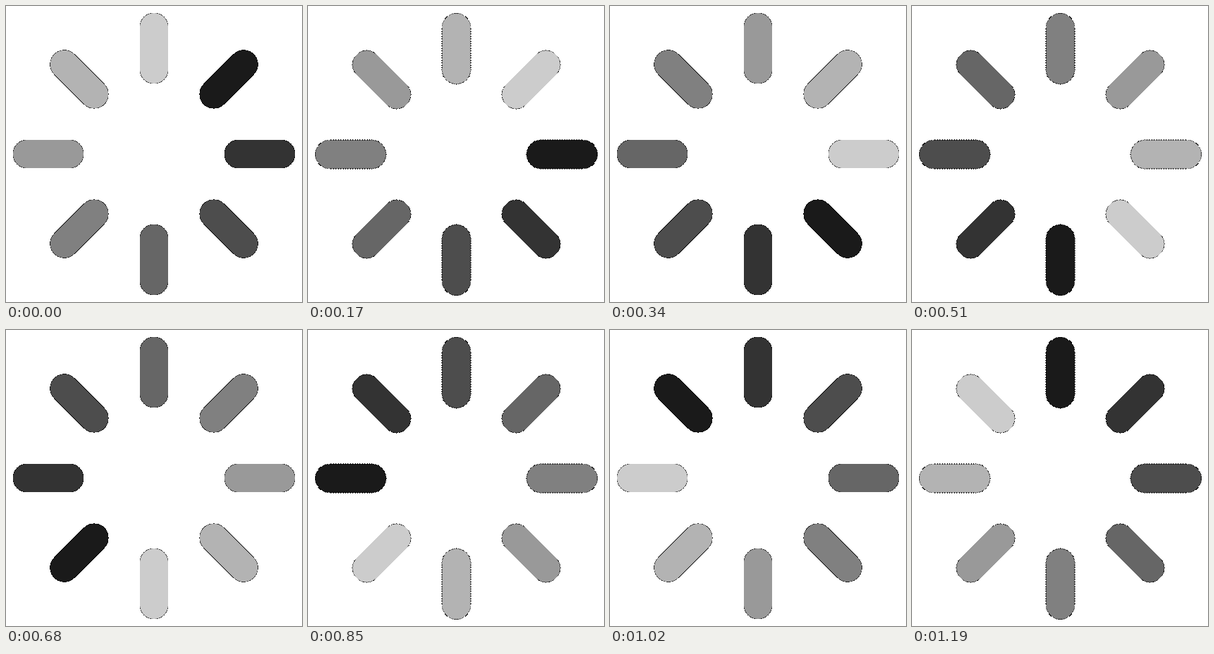
An HTML page with a canvas that plays this animation: 420 px wide and 420 px high, repeating every 1360 ms.

```html
<!DOCTYPE html>
<html lang="en">
<head>
<meta charset="utf-8">
<title>Spinner</title>
<style>
  html, body { margin: 0; width: 100%; height: 100%; overflow: hidden; background: #fff; }
  canvas { display: block; }
</style>
</head>
<body>
<canvas id="stage" width="420" height="420"></canvas>
<script>
const SIZE = 420, BARS = 8, STEP_MS = 170;
const INNER = 120, OUTER = 180, RADIUS = 20;
const TURN = Math.PI / 4, SUB = 4;
const ctx = document.getElementById('stage').getContext('2d');

const barAt = (x, y) => (Math.round(Math.atan2(x, -y) / TURN) + BARS) % BARS;

// Signed distance from a point, relative to the centre, to the edge of a bar.
function distance(x, y, bar) {
  const s = Math.sin(bar * TURN), c = Math.cos(bar * TURN);
  const along = x * s - y * c, across = x * c + y * s;
  return Math.hypot(across, Math.max(INNER - along, along - OUTER, 0)) - RADIUS;
}

// Fraction of the unit pixel centred on (x, y) that the bar covers.
function coverage(x, y, bar) {
  const dist = distance(x, y, bar);
  if (Math.abs(dist) > 0.75) return dist < 0 ? 1 : 0;
  let hits = 0;
  for (let i = 0; i < SUB * SUB; i++) {
    const dx = (i % SUB + 0.5) / SUB - 0.5;
    const dy = (Math.floor(i / SUB) + 0.5) / SUB - 0.5;
    if (distance(x + dx, y + dy, bar) < 0) hits++;
  }
  return hits / (SUB * SUB);
}

// Partly covered pixels are opaque and fade to black, which leaves a dark rim.
function shade(x, y, step) {
  const bar = barAt(x, y);
  const cover = coverage(x, y, bar);
  const level = (bar - step - 1 + 2 * BARS) % BARS + 1;
  return cover > 0 ? Math.round(level * 25.5 * cover) : 255;
}

// Odd steps are the previous step turned by an eighth, sampled at the nearest pixel.
function pixel(px, py, step) {
  const x = px - SIZE / 2, y = py - SIZE / 2;
  if (step % 2 === 0) return shade(x + 0.5, y + 0.5, step);
  const c = Math.SQRT1_2;
  return shade(Math.floor((x + y) * c) + 0.5, Math.floor((y - x) * c) + 0.5, step - 1);
}

function render(step) {
  const image = ctx.createImageData(SIZE, SIZE);
  for (let y = 0, i = 0; y < SIZE; y++) {
    for (let x = 0; x < SIZE; x++, i += 4) {
      image.data.fill(pixel(x, y, step), i, i + 3);
      image.data[i + 3] = 255;
    }
  }
  return image;
}

const poses = Array.from({ length: BARS }, (_, step) => render(step));
const start = performance.now();
let shown = -1;

function tick() {
  const step = Math.floor((performance.now() - start) / STEP_MS) % BARS;
  if (step !== shown) ctx.putImageData(poses[shown = step], 0, 0);
  requestAnimationFrame(tick);
}
tick();
</script>
</body>
</html>
```
